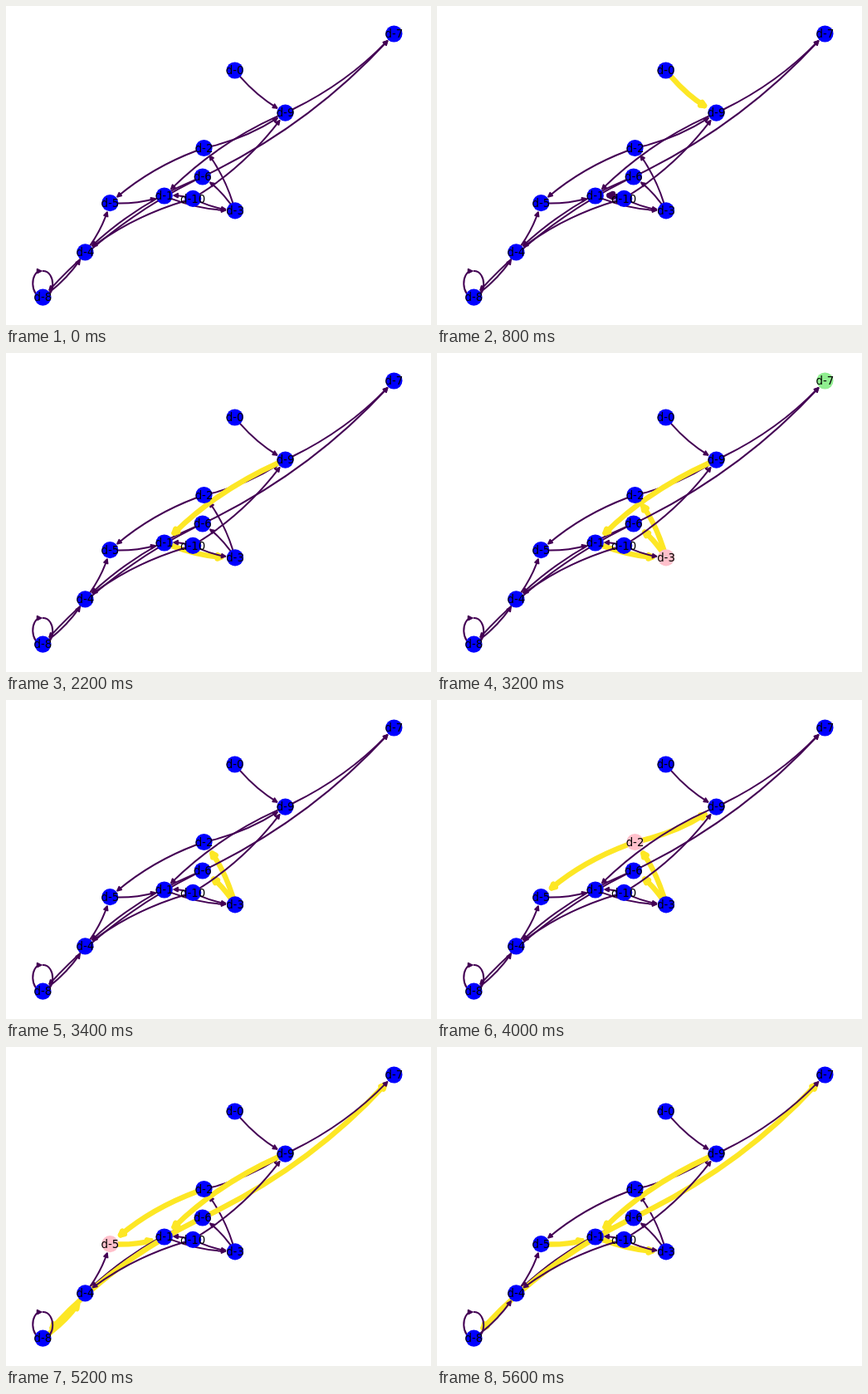
An HTML page for the animation above (6000 ms loop, 512 by 384 pixels).

```html
<!DOCTYPE html>
<html lang="en">
<head>
<meta charset="utf-8">
<title>Message passing graph</title>
<style>
html, body { margin: 0; width: 100%; height: 100%; overflow: hidden; background: #fff; }
svg { display: block; width: 512px; height: 384px; }
text { font: 13.33px "DejaVu Sans", sans-serif; text-anchor: middle; }
</style>
</head>
<body>
<svg id="stage" viewBox="0 0 512 384"></svg>
<script>
const LOOP = 6000, BEND = 0.1, MARGIN = 9.6, RADIUS = 10.1;
const HEAD_LENGTH = 4.44, HEAD_WIDTH = 2.22;
const THIN = 2, THICK = 6.4;
const DARK = '#440154', YELLOW = '#fde725';
const BLUE = '#0000ff', PINK = '#ffc0cb', GREEN = '#90ee90';

const nodes = {
  0: [275.7, 77.5], 1: [190.7, 228.5], 2: [238.5, 171], 3: [276, 246.3],
  4: [95.4, 296.3], 5: [125.3, 237.2], 6: [236.8, 205.5], 7: [467.4, 33.5],
  8: [44.4, 350.6], 9: [336.5, 128.6], 10: [225.2, 231.8]
};

// Listed in paint order
const links = ('0>9 1>3 2>5 2>9 3>2 3>6 4>5 5>1 6>4 6>8 6>7 ' +
  '8>4 8>8 9>1 9>7 10>1 10>3 10>4 10>9').split(' ');

// Each step: start time, lit links, node colours, heavy dark links
const steps = [
  { at: 0, lit: '' },
  { at: 600, lit: '0>9', fill: { 0: PINK }, heavy: '10>1' },
  { at: 800, lit: '0>9', heavy: '10>1' },
  { at: 1400, lit: '0>9 9>1 8>4', fill: { 9: PINK } },
  { at: 1600, lit: '9>1 8>4' },
  { at: 2000, lit: '9>1 8>4 1>3', fill: { 1: PINK } },
  { at: 2200, lit: '9>1 1>3' },
  { at: 3200, lit: '9>1 1>3 3>2 3>6', fill: { 3: PINK, 7: GREEN } },
  { at: 3400, lit: '3>2 3>6' },
  { at: 4000, lit: '3>2 3>6 2>5 2>9', fill: { 2: PINK } },
  { at: 4200, lit: '3>6 2>5 2>9' },
  { at: 4800, lit: '3>6 2>5 2>9 9>1 8>4', fill: { 9: PINK } },
  { at: 5000, lit: '3>6 2>5 9>1 8>4 6>8 6>7', fill: { 6: PINK } },
  { at: 5200, lit: '2>5 9>1 8>4 6>8 6>7 5>1', fill: { 5: PINK } },
  { at: 5400, lit: '9>1 8>4 6>8 6>7 5>1 1>3', fill: { 1: PINK } },
  { at: 5600, lit: '9>1 6>8 6>7 5>1 1>3' }
];

const stage = document.getElementById('stage');
const mix = (a, b, t) => [a[0] + (b[0] - a[0]) * t, a[1] + (b[1] - a[1]) * t];
const dist = (a, b) => Math.hypot(a[0] - b[0], a[1] - b[1]);
const str = p => p[0].toFixed(2) + ' ' + p[1].toFixed(2);

function add(tag, attrs) {
  const el = document.createElementNS('http://www.w3.org/2000/svg', tag);
  for (const k in attrs) el.setAttribute(k, attrs[k]);
  return stage.appendChild(el);
}

// Parameter at which the curve leaves the circle around its start
function exitAt(a, c, b) {
  let lo = 0, hi = 0.8;
  for (let i = 0; i < 24; i++) {
    const t = (lo + hi) / 2;
    const p = mix(mix(a, c, t), mix(c, b, t), t);
    if (dist(p, a) < MARGIN) lo = t; else hi = t;
  }
  return lo;
}

// Part of a quadratic curve that lies outside both end nodes
function trim(a, b) {
  const mid = mix(a, b, 0.5);
  const c = [mid[0] - BEND * (b[1] - a[1]), mid[1] + BEND * (b[0] - a[0])];
  const s = exitAt(a, c, b), e = 1 - exitAt(b, c, a);
  const point = (t, u) => mix(mix(a, c, t), mix(c, b, t), u);
  return [point(s, s), point(s, e), point(e, e)];
}

// Pulls the tip back so the stroked head stays short of the end
function head(from, end, width) {
  const len = dist(from, end);
  const ux = (end[0] - from[0]) / len, uy = (end[1] - from[1]) / len;
  const back = width / 2 * Math.hypot(HEAD_LENGTH, HEAD_WIDTH) / HEAD_WIDTH;
  const tip = [end[0] - ux * back, end[1] - uy * back];
  const wing = side => [
    tip[0] - ux * HEAD_LENGTH - uy * HEAD_WIDTH * side,
    tip[1] - uy * HEAD_LENGTH + ux * HEAD_WIDTH * side
  ];
  return { tip, d: `M${str(wing(1))}L${str(tip)}L${str(wing(-1))}Z` };
}

function arrow(key, width) {
  const [a, b] = key.split('>').map(id => nodes[id]);
  if (a === b) {
    const [x, y] = a, h = 31.5, w = h / 2, top = [x, y - h];
    const { tip, d } = head([x - w, y - h], top, width);
    return [`M${str(top)}C${x + w} ${y - h} ${x + w} ${y} ${x} ${y}` +
      `C${x - w} ${y} ${x - w} ${y - h} ${str(tip)}`, d];
  }
  const [p, c, q] = trim(a, b);
  const { tip, d } = head(c, q, width);
  return [`M${str(p)}Q${str(c)} ${str(tip)}`, d];
}

const edges = links.map(key => ({
  key,
  line: add('path', { fill: 'none', 'stroke-linecap': 'round' }),
  cap: add('path', { 'stroke-linejoin': 'round' })
}));

const discs = {};
for (const id in nodes) {
  const [x, y] = nodes[id];
  discs[id] = add('circle', { cx: x, cy: y, r: RADIUS });
}
for (const id in nodes) {
  const [x, y] = nodes[id];
  add('text', { x, y: y + 4.7 }).textContent = 'd-' + id;
}

function paint(step) {
  const lit = step.lit.split(' '), heavy = (step.heavy || '').split(' ');
  for (const { key, line, cap } of edges) {
    const on = lit.includes(key);
    const width = on || heavy.includes(key) ? THICK : THIN;
    const color = on ? YELLOW : DARK;
    const [shaft, tip] = arrow(key, width);
    line.setAttribute('d', shaft);
    cap.setAttribute('d', tip);
    cap.setAttribute('fill', color);
    for (const el of [line, cap]) {
      el.setAttribute('stroke', color);
      el.setAttribute('stroke-width', width);
    }
  }
  for (const id in discs) {
    discs[id].setAttribute('fill', (step.fill && step.fill[id]) || BLUE);
  }
}

let shown = null;
const start = performance.now();
function tick() {
  const t = (performance.now() - start) % LOOP;
  const step = steps.filter(s => s.at <= t).pop();
  if (step !== shown) paint(shown = step);
  requestAnimationFrame(tick);
}
tick();
</script>
</body>
</html>
```
